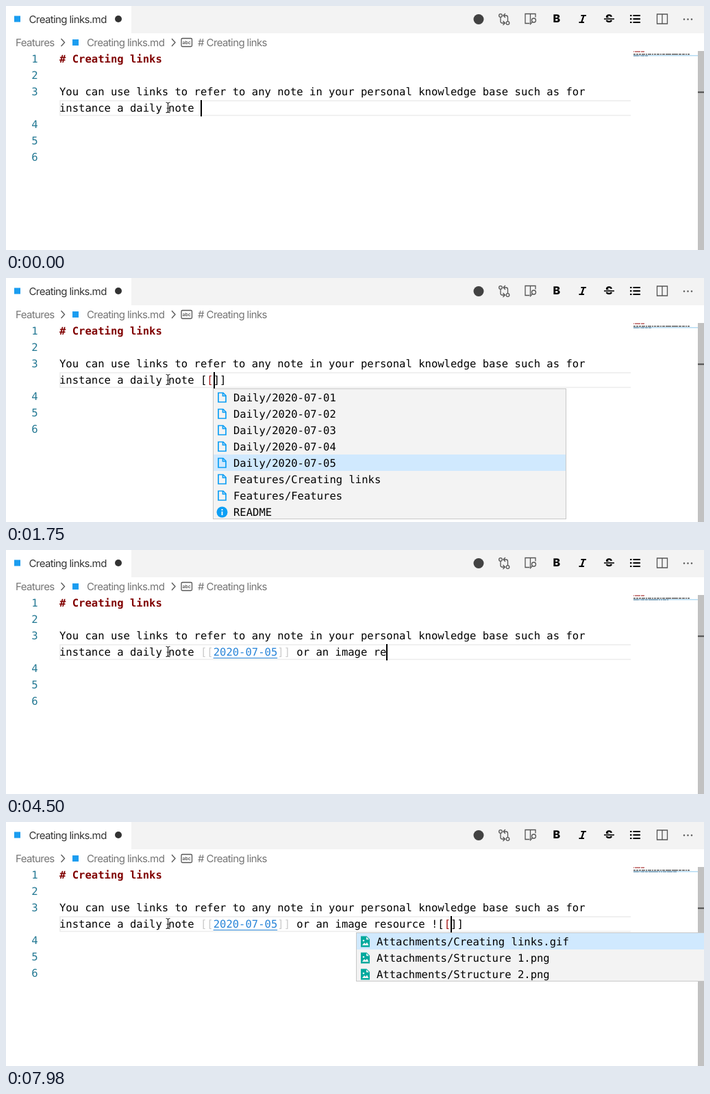
These frames come from a looping animation (1019x358 px, 8000 ms). An HTML page:

```html
<!DOCTYPE html>
<html lang="en">
<head>
<meta charset="utf-8">
<title>Creating links</title>
<style>
  html, body { margin: 0; width: 100%; height: 100%; overflow: hidden; background: #fff; }
  svg { display: block; width: 1019px; height: 358px; }
  text { white-space: pre; text-rendering: geometricPrecision; }
  .code text { font: 15.55px "DejaVu Sans Mono", monospace; }
  .code .head { font-weight: 700; fill: #800000; }
  .code .num { fill: #237893; text-anchor: end; }
  .ui { font: 15px Inter, sans-serif; letter-spacing: -.6px; }
  .crumb { fill: #757575; }
  .bold { font: 800 16px Inter, sans-serif; }
  .line { fill: none; stroke: #555; stroke-width: 1.3; }
  .red { fill: #a31515; }
  .dim { fill: #cbcbcb; }
  .link { fill: #2784d8; }
  .mini { fill: none; stroke-width: 1.4; opacity: .75; }
</style>
</head>
<body>
<svg viewBox="0 0 1019 358" xmlns="http://www.w3.org/2000/svg">
  <rect width="1019" height="358" fill="#fff"/>
  <rect x="183" width="836" height="40" fill="#f3f3f3"/>

  <!-- tab and breadcrumbs -->
  <rect x="12" y="14.5" width="9" height="9" fill="#1b9df0"/>
  <text class="ui" x="33.5" y="25" fill="#333">Creating links.md</text>
  <circle cx="164" cy="19" r="5" fill="#333"/>
  <g class="ui crumb">
    <text x="14" y="59">Features</text>
    <text x="118" y="59">Creating links.md</text>
    <text x="280" y="59"># Creating links</text>
  </g>
  <rect x="97" y="49" width="9" height="9" fill="#1b9df0"/>
  <path class="line" d="M80.500 48l5 5.500-5 5.500M242 48l5 5.500-5 5.500"/>
  <rect class="line" x="256" y="47.500" width="15.500" height="12" rx="1.500"/>
  <text x="263.700" y="56" text-anchor="middle" fill="#555" style="font:600 7px Inter,sans-serif">abc</text>

  <!-- toolbar -->
  <circle cx="690" cy="19.500" r="7.500" fill="#424242"/>
  <g class="line">
    <circle cx="722" cy="14" r="2.300"/><circle cx="732.500" cy="25" r="2.300"/>
    <path d="M722 16.500v6q0 2.500 2.500 2.500h3M725.500 22l3 3-3 3M732.500 22.500v-6q0-2.500-2.500-2.500h-3M729 17l-3-3 3-3"/>
    <path d="M764.500 25.500h-6.500v-14h15v5M765.500 11.500v14"/>
    <circle cx="770.500" cy="21" r="3"/><path d="M768.500 23.200l-3.500 4"/>
    <path d="M950.500 12h15v14h-15zM958 12v14"/>
  </g>
  <text class="bold" x="798.500" y="24">B</text>
  <path d="M839.500 14h7.500M836.500 24h7.500M843.500 14l-3.300 10" fill="none" stroke="#000" stroke-width="2.200"/>
  <text class="bold" x="875" y="24">S</text>
  <path d="M873 19h15" stroke="#f3f3f3" stroke-width="3.500"/>
  <path d="M873 19h15" stroke="#000" stroke-width="1.600"/>
  <path d="M911 14h2.500M911 19h2.500M911 24h2.500M915.500 14h10.500M915.500 19h10.500M915.500 24h10.500" stroke="#000" stroke-width="2"/>
  <g fill="#555"><circle cx="990" cy="19.500" r="1.200"/><circle cx="995.500" cy="19.500" r="1.200"/><circle cx="1001" cy="19.500" r="1.200"/></g>

  <!-- editor -->
  <path d="M912 139H79v21.500h833" fill="none" stroke="#ececec" stroke-width="1.600"/>
  <g class="code">
    <g id="nums"></g>
    <text class="head" x="78" y="83"># Creating links</text>
    <text id="para" x="78" y="131"></text>
    <text id="typed" x="78" y="155"></text>
  </g>
  <rect id="under" x="302.600" y="158" width="93.600" height="1" fill="#2784d8"/>
  <rect id="caret" y="138" width="2" height="24" fill="#000"/>
  <path d="M233.500 141.500q3 0 3 2v11q0 2-3 2M239.500 141.500q-3 0-3 2v11q0 2 3 2M234.500 150h4" fill="none" stroke="#222" stroke-width="1.200"/>

  <!-- minimap and scrollbar -->
  <rect x="916" y="72" width="94" height="1.500" fill="#b4dbf3"/>
  <path class="mini" id="mini1" stroke="#a02020"/>
  <path class="mini" id="mini3" stroke="#222"/>
  <path class="mini" id="mini4" stroke="#58809c"/>
  <rect x="1010" y="66" width="9" height="292" fill="#c1c1c1"/>
  <rect x="1010" y="125.500" width="9" height="2" fill="#484848"/>

  <g class="code" id="menus"></g>
</svg>
<script>
const $ = id => document.getElementById(id);
const LOOP = 8000, LEFT = 78, CELL = 9.36;
const PARA = 'You can use links to refer to any note in your personal knowledge base such as for';
const LEAD = 'instance a daily note ';
const LINK = '[[2020-07-05]]';

// Each step changes part of the state at a given time.
const state = { body: '', col: 22, caret: 1, menu: -1, row: 0, styled: 0, under: 0 };
const steps = [];
const at = (t, change) => steps.push([t, { ...Object.assign(state, change) }]);
const type = (chars, ...times) => times.forEach((t, i) =>
  at(t, { body: state.body + chars[i], col: state.col + 1, caret: 1 }));

at(0, {});
at(470, { body: '[]', col: 23 });
at(680, { body: '[[]]', col: 24 });
at(800, { menu: 0 });
at(1210, { caret: 0 });
at(1330, { row: 1 });
at(1450, { row: 2 });
at(1630, { row: 3 });
at(1750, { row: 4, caret: 1 });
at(2100, { body: LINK, col: 34, menu: -1, row: 0 });
at(2280, { styled: 1 });
at(2520, { col: 35 });
at(2630, { col: 36 });
type(' or ', 2870, 3020, 3080, 3140);
at(3200, { under: 1 });
type('an', 3260, 3440);
type(' image r', ...Array.from({ length: 8 }, (_, i) => 3680 + i * 740 / 7));
type('esour', 4500, 4710, 4890, 5030, 5180);
type('ce ', 5360, 5690, 5780);
at(6280, { caret: 0 });
type('!', 6550);
const before = state.body;
at(6820, { body: before + '[]', col: 60 });
at(6910, { body: before + '[[]]', col: 61 });
at(7030, { menu: 1 });
at(7440, { caret: 0 });
at(7980, { caret: 1 });

const fileIcon = (x, y) =>
  `<path d="M${x + 1} ${y + 1}h7l4 4v9.500h-11zM${x + 7.5} ${y + 1}v4.500h4.500" fill="none" stroke="#0c9ff5" stroke-width="1.700"/>`;
const infoIcon = (x, y) =>
  `<circle cx="${x + 6.5}" cy="${y + 8}" r="8" fill="#0c9ff5"/>
   <path d="M${x + 6.5} ${y + 3.5}v2M${x + 6.5} ${y + 7}v5.500" stroke="#fff" stroke-width="1.800"/>`;
const imageIcon = (x, y) =>
  `<path d="M${x} ${y}h8.500l4.500 4.500v11.500h-13z" fill="#00a99d"/>
   <path d="M${x + 8} ${y + 1}v4h4M${x + 2} ${y + 13.500}l3-4 2 2 2-2.500 2.500 4.500z" fill="#f3f3f3"/>
   <circle cx="${x + 4}" cy="${y + 6.500}" r="1.300" fill="#f3f3f3"/>`;

const days = [1, 2, 3, 4, 5].map(d => `Daily/2020-07-0${d}`);
const menus = [
  { x: 302, icon: fileIcon, items: [...days, 'Features/Creating links', 'Features/Features', 'README'] },
  { x: 511, icon: imageIcon, items: ['Attachments/Creating links.gif', 'Attachments/Structure 1.png', 'Attachments/Structure 2.png'] }
];

function menuMarkup({ x, icon, items }) {
  const rows = items.map((name, i) => {
    const y = 163 + i * 24;
    const draw = name === 'README' ? infoIcon : icon;
    return draw(x + 7, y + 4.5) + `<text x="${x + 30}" y="${y + 18}">${name}</text>`;
  });
  return `<g><rect x="${x + .5}" y="162.500" width="515" height="${items.length * 24 - 1}" fill="#f3f3f3" stroke="#c8c8c8"/>
    <rect class="pick" x="${x + 1}" width="514" height="24" fill="#d0e9fe"/>${rows.join('')}</g>`;
}

const miniLine = (text, y) =>
  [...text].map((c, i) => c === ' ' ? '' : `M${916 + i} ${y}h1`).join('');

const span = (cls, s) => `<tspan class="${cls}">${s}</tspan>`;
const paint = (body, styled) => body.replace(/\[\[(.*?)\]\]/g, (_, name) =>
  !name ? '[' + span('red', '[') + ']]'
  : styled ? span('dim', '[[') + span('link', name) + span('dim', ']]')
  : '[[' + span('red', name) + ']]');

$('nums').innerHTML = [83, 107, 131, 179, 203, 227]
  .map((y, i) => `<text class="num" x="46.500" y="${y}">${i + 1}</text>`).join('');
$('para').textContent = PARA;
$('mini1').setAttribute('d', miniLine('# Creating links', 67));
$('mini3').setAttribute('d', miniLine(PARA, 70.7));
$('menus').innerHTML = menus.map(menuMarkup).join('');
const boxes = [...$('menus').children];

const show = (el, on) => el.setAttribute('visibility', on ? 'visible' : 'hidden');

let shown;
function render(s) {
  $('typed').innerHTML = LEAD + paint(s.body, s.styled);
  $('mini4').setAttribute('d', miniLine(LEAD + s.body, 73));
  $('caret').setAttribute('x', Math.round(LEFT + s.col * CELL));
  show($('caret'), s.caret);
  show($('under'), s.under);
  boxes.forEach((box, i) => {
    show(box, s.menu === i);
    box.querySelector('.pick').setAttribute('y', 163 + s.row * 24);
  });
}

function tick() {
  const t = performance.now() % LOOP;
  const step = steps.filter(s => s[0] <= t).pop()[1];
  if (step !== shown) render(shown = step);
  requestAnimationFrame(tick);
}
tick();
</script>
</body>
</html>
```
